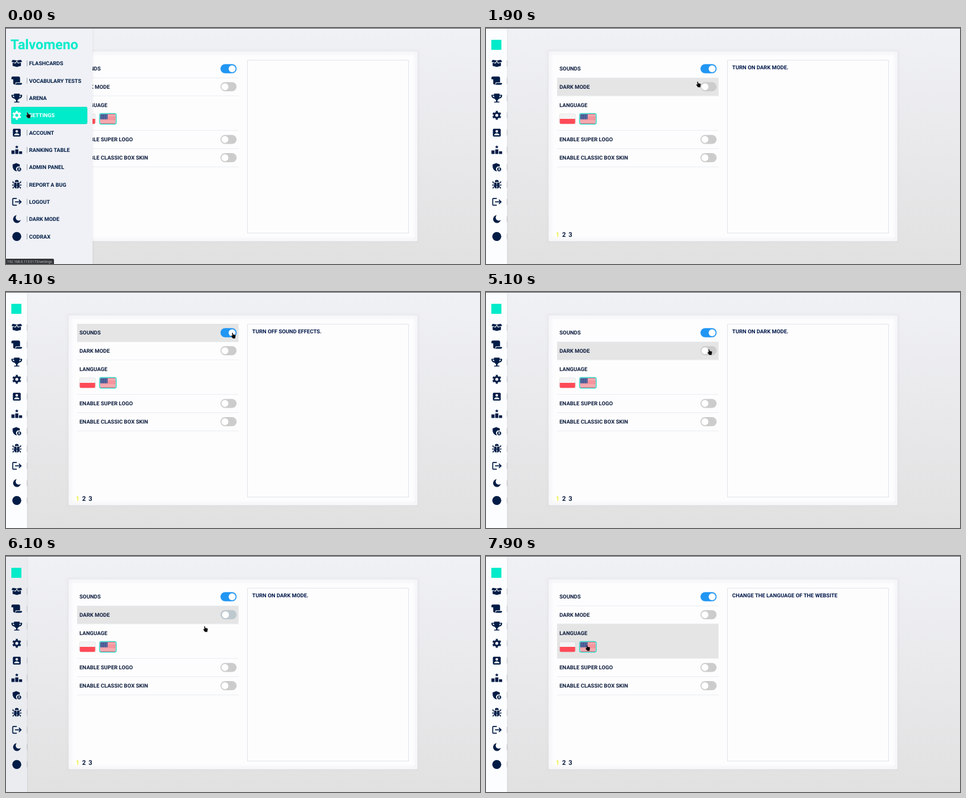
These frames come from a looping animation (800 px wide and 400 px high, 8000 ms). An HTML page:

```html
<!DOCTYPE html>
<html lang="en">
<head>
<meta charset="utf-8">
<title>Settings</title>
<style>
html, body { margin: 0; width: 100%; height: 100%; overflow: hidden; }
svg {
  display: block; width: 800px; height: 400px;
  font: 700 9.12px Roboto, sans-serif; text-rendering: geometricPrecision;
  --top: #f0f1f5; --bottom: #e1e1e1; --panel: #fdfdfe; --edge: #f3f3f6; --line: #eaecf0;
  --frame: #e1e4ea; --hover: #e5e5e5; --text: #0d1d3d; --note: #00174a; --icon: #001c46;
  --brand: #00ebca; --page: #eff04a;
}
svg.dark {
  --top: #000e35; --bottom: #001f52; --panel: #1b2c44; --edge: #0d2040; --line: #13243f;
  --frame: #0b2147; --hover: #002050; --text: #bccdee; --note: #fff; --icon: #fff;
  --brand: #1ab59c; --page: #e4bba5;
}
.row { fill: var(--text); }
.icon { fill: var(--icon); fill-rule: evenodd; }
.icon .s { fill: none; stroke: var(--icon); stroke-width: 1.7; }
.active { --icon: #fff; }
</style>
</head>
<body>
<svg id="stage" viewBox="0 0 800 400">
  <defs>
    <linearGradient id="sky" x2="0" y2="1">
      <stop style="stop-color:var(--top)"/><stop offset="1" style="stop-color:var(--bottom)"/>
    </linearGradient>
    <filter id="soft" x="-5%" y="-5%" width="110%" height="110%"><feGaussianBlur stdDeviation="2"/></filter>
    <clipPath id="sideClip"><rect id="sideMask" height="400"/></clipPath>
    <clipPath id="flagClip"><rect x="159" y="146" width="26" height="16" rx="2"/></clipPath>
  </defs>
  <rect width="800" height="400" fill="url(#sky)"/>
  <rect x="106" y="40" width="588" height="321" fill="none" stroke="#000" stroke-opacity=".1" stroke-width="2" filter="url(#soft)"/>
  <rect x="106" y="40" width="588" height="321" rx="1" style="fill:var(--panel)"/>
  <rect x="108" y="42" width="584" height="317" fill="none" stroke-width="4" style="stroke:var(--edge)" filter="url(#soft)"/>
  <rect id="hover" x="120" width="272.5" style="fill:var(--hover)"/>
  <g id="rows"></g>
  <g id="flags">
    <rect x="124" y="145.5" width="27" height="17" rx="2.5" fill="#f4f4f5" stroke="#000" stroke-opacity=".07"/>
    <path d="M124.5 154h26v6.5q0 2-2 2h-22q-2 0-2-2z" fill="#ff4b57"/>
    <rect x="158" y="145" width="28" height="18" rx="3" fill="#fff" stroke="#35cfc4" stroke-width="1.5"/>
    <g id="stripes" clip-path="url(#flagClip)"></g>
  </g>
  <rect x="407.5" y="54.5" width="272" height="293" fill="none" style="stroke:var(--frame)"/>
  <text id="note" x="415.5" y="70.3" style="fill:var(--note)"></text>
  <g font-size="11" text-anchor="middle" class="row">
    <text x="121" y="353.6" style="fill:var(--page)">1</text>
    <text x="131.6" y="353.6">2</text><text x="142.4" y="353.6">3</text>
  </g>
  <rect id="sideShade" height="400" fill="#000" opacity=".08" filter="url(#soft)"/>
  <rect id="side" height="400"/>
  <g clip-path="url(#sideClip)">
    <rect id="mark" x="9" y="20" width="17" height="17" style="fill:var(--brand)"/>
    <text id="title" x="7.5" y="36.3" font-size="23.2" style="fill:var(--brand)">Talvomeno</text>
    <rect id="chosen" x="9" y="134" width="128" height="28.5" rx="2" fill="#00ebca" stroke="#00d4b8" stroke-width=".6"/>
    <g id="menu"></g>
  </g>
  <g id="status">
    <path d="M0 391h79q2 0 2 2v7H0z" fill="#35363a"/>
    <text x="2" y="397.8" style="font:400 5.75px 'Noto Sans',sans-serif" fill="#c6c7ca">192.168.0.113:5173/settings</text>
  </g>
  <path id="topLine" d="M0 .5H800" stroke="#56575c"/>
  <path id="cursor" fill="#080808" stroke="#fff" stroke-opacity=".35" stroke-width=".4"
    d="M-2.6-4.8q.9-.7 1.6.2l.5 2.7 3 .5q1.2.4 1.1 1.5l-.5 2.5-.3 2.2h-3.9l-2-2.6-1-2 .7-.6 1.3.6z"/>
</svg>
<script>
const $ = id => document.getElementById(id);
const LOOP = 8000, STEP = 100;
const COLLAPSE = 500, STATUS_END = 1400, DARK_ON = 5300, DARK_OFF = 5900, FADE = 300;

const rows = [
  { label: 'SOUNDS', top: 54, bottom: 84.5, note: 'TURN OFF SOUND EFFECTS.' },
  { label: 'DARK MODE', top: 84.5, bottom: 115, note: 'TURN ON DARK MODE.' },
  { label: 'LANGUAGE', top: 115, bottom: 173.7, note: 'CHANGE THE LANGUAGE OF THE WEBSITE' },
  { label: 'ENABLE SUPER LOGO', top: 173.7, bottom: 204.5 },
  { label: 'ENABLE CLASSIC BOX SKIN', top: 204.5, bottom: 235.5 },
];
// [start time, hovered row]
const hovers = [[0, -1], [600, 2], [1600, 1], [2000, 0], [4600, 1], [6400, 2]];
// [time, x, y]
const pointer = [
  [0, 38, 148], [250, 38, 148], [1000, 289, 152], [1150, 290, 152], [2300, 384, 74], [4300, 384, 74],
  [4800, 378, 102], [5900, 378, 102], [6100, 337, 124], [6700, 138, 156], [7150, 138, 156],
  [7700, 172, 156], [8000, 172, 156],
];

const menu = [
  ['FLASHCARDS', '<path d="M-7-6L0-5-2.6-1-9-2.8zM7-6L0-5 2.6-1 9-2.8zM-7-1.3L-2 .2 0-3 2 .2 7-1.3V4.2L0 6-7 4.2z"/>'],
  ['VOCABULARY TESTS', '<path d="M-7-7H3q2.5 0 2.5 2.5V2.8H-2v1.6a2 2 0 0 1-4 0V-2.3H-9V-5q0-2 2-2zM-.8 4H9q0 3-3 3H-3.2Q-.8 6.5-.8 4z"/>'],
  ['ARENA', '<path d="M-4.7-7.5h9.4v2H9v1.8Q8.5.5 3.8 1.2 2.5 3 1.2 3.5V6h2q1.6 0 1.6 1.6h-9.6Q-4.8 6-3.2 6h2V3.5Q-2.5 3-3.8 1.2-8.5.5-9-3.7v-1.8h4.3zM-7.2-3.8q.4 2 2.9 3l-.4-3zM7.2-3.8q-.4 2-2.9 3l.4-3z"/>'],
  ['SETTINGS', '<circle r="4.1" class="s" style="stroke-width:3.2"/><circle r="6.2" class="s" pathLength="12" stroke-dasharray="1 1" transform="rotate(15)" style="stroke-width:2.8"/>'],
  ['ACCOUNT', '<path d="M-5-6.6H5q1.6 0 1.6 1.6V5q0 1.6-1.6 1.6H-5Q-6.6 6.6-6.6 5V-5q0-1.6 1.6-1.6zM0-4.4a2.2 2.2 0 1 0 .01 0zM-4.4 4.4h8.8V3.5Q3 1.2 0 1.2T-4.4 3.5z"/>'],
  ['RANKING TABLE', '<path d="M-9 .8h5.2v6H-9zM-2.6-1h5.2v7.8h-5.2zM3.8 2.3H9v4.5H3.8zM0-8l.9 1.9 2.1.2-1.6 1.4.5 2L0-3.6l-1.9 1.1.5-2L-3-5.9l2.1-.2z"/>'],
  ['ADMIN PANEL', '<path d="M-1-7l6 2.3v3.6A4.4 4.4 0 0 0 .4 6.3L-1 7q-6-3-6-8v-3.7zM4 0a3.5 3.5 0 1 0 .01 0zM4 1.1a1.1 1.1 0 1 0 .01 0zM2 5h4Q5.5 3.8 4 3.8T2 5z"/>'],
  ['REPORT A BUG', '<path d="M-3.3-4.4a3.3 3.3 0 0 1 6.6 0zM-3.9-3.4H-.5V7Q-4 6.5-4.3 2.5zM3.9-3.4H.5V7Q4 6.5 4.3 2.5z"/><path class="s" style="stroke-width:1.4" d="M-6.6-5.5v2l3 1.6M6.6-5.5v2l-3 1.6M-8 1H8M-6.2 7V5l2.5-1.6M6.2 7V5L3.7 3.4"/>'],
  ['LOGOUT', '<path class="s" d="M0-5.8H-5.6q-1.2 0-1.2 1.2v9.2q0 1.2 1.2 1.2H0M-3 0H6.6M3.6-3.6L7.2 0 3.6 3.6"/>'],
  ['DARK MODE', '<path d="M0-6.6A6.6 6.6 0 1 0 6.8 1.4 4.6 4.6 0 1 1 0-6.6z"/>'],
  ['CODRAX', '<circle r="7.6"/>'],
];

function toggle(y, id) {
  return `<g transform="translate(362 ${y})"><rect ${id ? `id="${id}Track"` : ''} y="-7.7" width="27.2" height="15.4" rx="7.7" fill="#ccc"/>
    <circle ${id ? `id="${id}Knob"` : ''} cx="7.5" r="5.9" fill="#fff"/></g>`;
}

$('rows').innerHTML = rows.map(({ label, top, bottom }, i) => {
  const y = i === 2 ? 130.5 : (top + bottom) / 2 - .2;
  return `<path d="M120 ${bottom}h272.5" style="stroke:var(--line)"/>
    <text class="row" x="124" y="${y + 3.3}">${label}</text>` +
    (i === 2 ? '' : toggle(y, ['sound', 'dark'][i]));
}).join('');
$('soundTrack').setAttribute('fill', '#2196f3');
$('soundKnob').setAttribute('cx', 19.6);

let flag = '';
for (let i = 0; i < 7; i++) flag += `<path d="M159 ${146.6 + i * 2.46}h26" stroke="#ee4f5d" stroke-width="1.3"/>`;
flag += '<path d="M159 146h12.5v8.7H159z" fill="#41538f"/>';
for (let i = 0; i < 12; i++) {
  flag += `<circle cx="${160.6 + i % 4 * 3}" cy="${147.5 + Math.floor(i / 4) * 2.8}" r=".5" fill="#dfe4f4"/>`;
}
$('stripes').innerHTML = flag;

$('menu').innerHTML = menu.map(([label, icon], i) => {
  const y = 60 + i * 29.33;
  return `<g class="icon" id="item${i}"><g transform="translate(18.2 ${y})">${icon}</g>
    <path d="M35.5 ${y - 5}v10" stroke="#8d96a8" stroke-width=".9"/><text x="39" y="${y + 3.3}">${label}</text></g>`;
}).join('');

const clamp = v => Math.max(0, Math.min(1, v));
const ease = p => 1 - (1 - clamp(p)) ** 2.3;
const mix = (a, b, k) => a.map((v, i) => v + (b[i] - v) * k);
const rgb = c => `rgb(${c.map(Math.round)})`;
const show = (id, on) => $(id).setAttribute('visibility', on ? 'visible' : 'hidden');
const set = (id, attrs) => { for (const key in attrs) $(id).setAttribute(key, attrs[key]); };

// Monotone cubic interpolation: smooth through moving points, still at rests.
function along(points, t, axis) {
  const last = points.length - 2;
  const slope = i => i < 0 || i > last ? 0 :
    (points[i + 1][axis] - points[i][axis]) / (points[i + 1][0] - points[i][0]);
  const tangent = i => {
    const a = slope(i - 1), b = slope(i);
    return a * b > 0 ? 2 * a * b / (a + b) : 0;
  };
  let i = 0;
  while (i < last && points[i + 1][0] <= t) i++;
  const span = points[i + 1][0] - points[i][0], p = (t - points[i][0]) / span;
  const s = p * p * (3 - 2 * p);
  return points[i][axis] * (1 - s) + points[i + 1][axis] * s +
    span * p * (1 - p) * (tangent(i) * (1 - p) - tangent(i + 1) * p);
}

function draw(t) {
  const dark = t >= DARK_ON && t < DARK_OFF;
  const darkness = ease((t - DARK_ON) / FADE) - ease((t - DARK_OFF) / FADE);
  const fold = ease((t - COLLAPSE) / FADE), open = t < COLLAPSE;
  $('stage').classList.toggle('dark', dark);

  const width = 146 - 110.5 * fold;
  for (const id of ['side', 'sideMask', 'sideShade']) set(id, { width });
  const light = mix([239, 241, 246], [252, 253, 255], fold);
  set('side', { fill: rgb(mix(light, [27, 43, 66], darkness)) });
  show('title', open);
  show('mark', !open);
  show('chosen', open);
  $('item3').classList.toggle('active', open);
  show('status', t < STATUS_END);
  set('topLine', { stroke: dark ? '#000c2b' : '#56575c' });

  const row = rows[hovers.filter(h => h[0] <= t).pop()[1]];
  show('hover', row);
  if (row) set('hover', { y: row.top, height: row.bottom - row.top });
  $('note').textContent = row ? row.note : '';

  set('darkTrack', { fill: rgb(mix([204, 204, 204], [33, 150, 243], darkness)) });
  set('darkKnob', { cx: 7.5 + 12.1 * darkness });
  set('cursor', { transform: `translate(${along(pointer, t, 1)} ${along(pointer, t, 2)})` });
}

function tick() {
  draw(Math.floor(performance.now() % LOOP / STEP) * STEP);
  requestAnimationFrame(tick);
}
tick();
</script>
</body>
</html>
```
